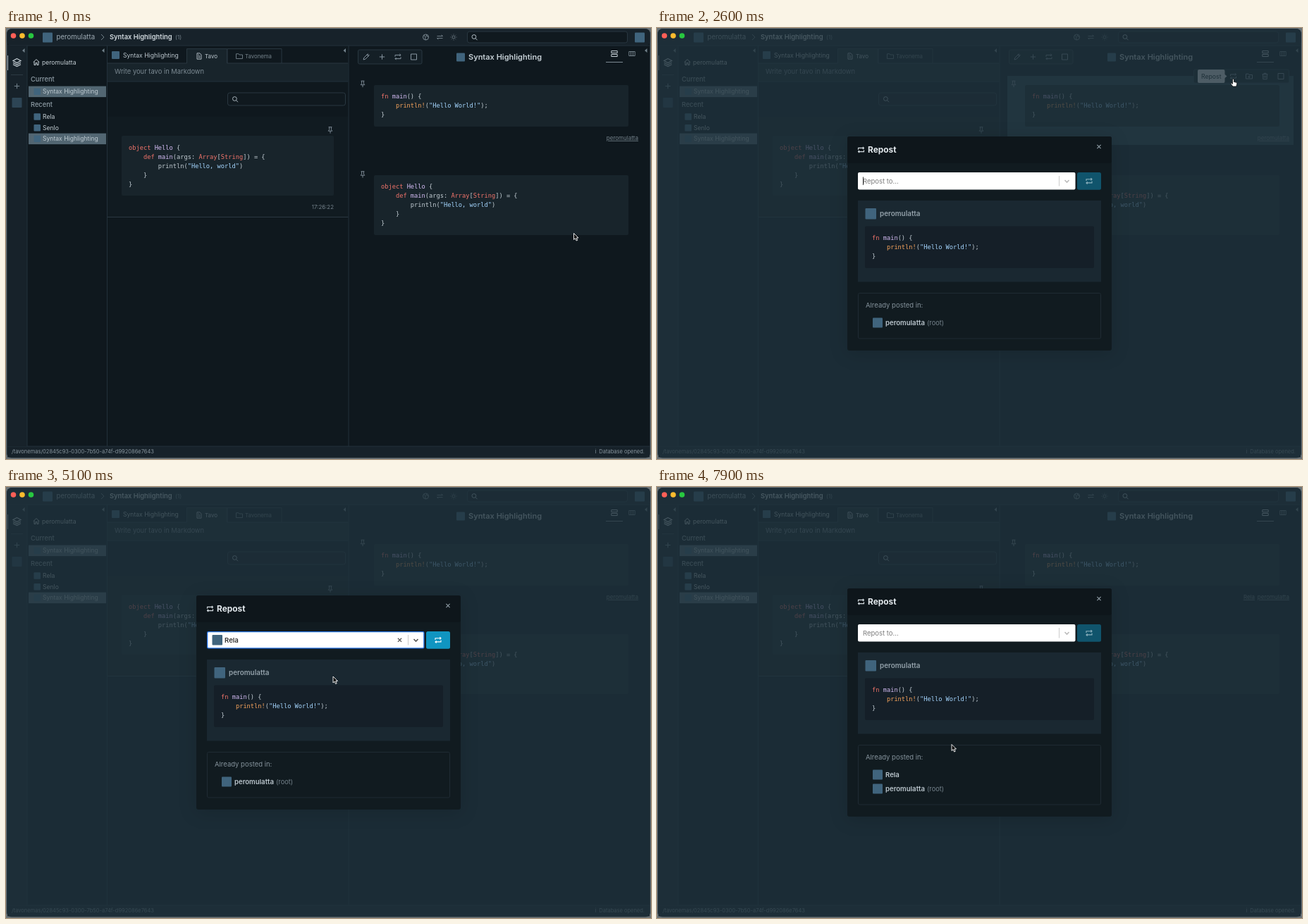
Animation, 915 px wide and 612 px high, one loop 8000 ms. Source, as an HTML page:

```html
<!DOCTYPE html>
<html lang="en">
<head>
<meta charset="utf-8">
<title>Repost dialog</title>
<style>
  html, body { margin: 0; width: 100%; height: 100%; overflow: hidden; background: #6b7377; }
  svg { display: block; width: 100%; height: 100%; }
  text { font-family: Inter, "Open Sans", sans-serif; white-space: pre; }
  .code { font: 8.7px "DejaVu Sans Mono", monospace; fill: #c2ccd3; }
  .key { fill: #f0736a; } .fn { fill: #d5bdf5; } .str { fill: #a5d6ff; } .macro { fill: #f5a35c; }
  .raised { filter: drop-shadow(0 4px 12px rgba(0, 0, 0, .14)); }
</style>
</head>
<body>
<svg id="stage" viewBox="0 0 915 612"></svg>
<script>
const LOOP = 8000, STEP = 100;
const USER = 'peromulatta', TOPIC = 'Syntax Highlighting', TARGET = 'Rela', OTHER = 'Senlo';
const stage = document.getElementById('stage');

// Stroked icons, centred on 0,0
const ICONS = {
  repost: 'M-4-.3V-2.6H4M2.4-4.2 4-2.6 2.4-1M4 .3V2.6H-4M-2.4 1-4 2.6-2.4 4.2',
  sync: 'M-4-1.5H4L2.2-3.3M4 1.5H-4L-2.2 3.3',
  pencil: 'M-4 4-3.2 1.2 2.2-4.2 4.2-2.2-1.2 3.2ZM1-3 3-1',
  plus: 'M-3.7 0H3.7M0-3.7V3.7',
  square: 'M-4-4H4V4H-4Z',
  pin: 'M-2.4-4.3H2.4M-1.4-4.3V-.6L-2.8 1.2H2.8L1.4-.6V-4.3M0 1.2V4.6',
  trash: 'M-4-2.8H4M-1.5-2.8V-4.2H1.5V-2.8M-3-2.8-2.7 4.2H2.7L3-2.8M-1-.8V2.3M1-.8V2.3',
  folder: 'M-4.5-3.3H-1L0-2H4.5V3.5H-4.5Z',
  folderPlus: 'M-4.5-3.3H-1L0-2H4.5V3.5H-4.5ZM-1.7.8H1.7M0-.9V2.5',
  doc: 'M-3-4.2H1L3-2V4.2H-3ZM-1.5 0H1.5M-1.5 2H1.5M-1.5-2H0',
  search: 'M2.3-.5A2.9 2.9 0 1 1-3.5-.5 2.9 2.9 0 0 1 2.3-.5M1.5 1.6 4 4.2',
  globe: 'M4 0A4 4 0 1 1-4 0 4 4 0 0 1 4 0M-3-2.5 0-.5-1 1.2 0 3.8M1-3.8 1-1.6 3.7-.5',
  sun: 'M2 0A2 2 0 1 1-2 0 2 2 0 0 1 2 0M0-4.5V-3.5M0 3.5V4.5M-4.5 0H-3.5M3.5 0H4.5M-3.2-3.2-2.5-2.5M2.5 2.5 3.2 3.2M-3.2 3.2-2.5 2.5M2.5-2.5 3.2-3.2',
  home: 'M-4 0 0-4 4 0M-3-1V4H-1V1H1V4H3V-1',
  layers: 'M0-5 5.5-2 0 1-5.5-2ZM-5.5.8 0 3.6 5.5.8M-5.5 3.3 0 6.1 5.5 3.3',
  rows: 'M-4.2-4H4.2V-1H-4.2ZM-4.2 1H4.2V4H-4.2Z',
  columns: 'M-4.2-3H4.2V3H-4.2ZM-1.4-3V3M1.4-3V3',
  right: 'M-2-4 2 0-2 4',
  down: 'M-3-1.6 0 1.6 3-1.6',
  close: 'M-2.6-2.6 2.6 2.6M2.6-2.6-2.6 2.6',
  arrowUp: 'M0 3.5V-3.5M-2.8-.8 0-3.5 2.8-.8',
  arrowDown: 'M0-3.5V3.5M-2.8.8 0 3.5 2.8.8',
  toTop: 'M0 4V-2M-2.8.6 0-2 2.8.6M-3.6-4.2H3.6',
  toBottom: 'M0-4V2M-2.8-.6 0 2 2.8-.6M-3.6 4.2H3.6'
};

const rect = (x, y, w, h, fill, stroke = 'none', r = 0) =>
  `<rect x="${x}" y="${y}" width="${w}" height="${h}" rx="${r}" fill="${fill}" stroke="${stroke}"/>`;
const line = (x1, y1, x2, y2, color = '#22303a') =>
  `<path d="M${x1} ${y1}L${x2} ${y2}" stroke="${color}"/>`;
const icon = (name, x, y, color = '#8795a0', width = 1) =>
  `<path transform="translate(${x} ${y})" d="${ICONS[name]}" fill="none" stroke="${color}" stroke-width="${width}"/>`;
// y is the middle of the capitals
const label = (x, y, str, size, color, weight = 400, extra = '') =>
  `<text x="${x}" y="${y + size * .36}" font-size="${size}" fill="${color}" font-weight="${weight}" ${extra}>${str}</text>`;
const avatar = (x, y, size, color = '#40647d') => rect(x, y, size, size, color, 'none', 1);
const tok = (kind, str) => `<tspan class="${kind}">${str}</tspan>`;
const code = (x, y, lines) => lines.map((s, i) =>
  `<text class="code" x="${x}" y="${y + i * 13.1}">${s}</text>`).join('');

const HELLO_FN = [
  `${tok('key', 'fn')} ${tok('fn', 'main')}() {`,
  `    ${tok('macro', 'println!')}(${tok('str', '"Hello World!"')});`,
  '}'];
const HELLO_OBJECT = [
  `${tok('key', 'object')} ${tok('fn', 'Hello')} {`,
  `    ${tok('key', 'def')} ${tok('fn', 'main')}(args: ${tok('key', 'Array')}[${tok('key', 'String')}]) = {`,
  `        println(${tok('str', '"Hello, world"')})`,
  '    }', '}'];

const chip = y => rect(32, y - 7.7, 110, 15.5, '#526672') + avatar(39.5, y - 4.7, 9.5) +
  label(52, y, TOPIC, 8.6, '#bdc9d0');
const listItem = (y, name) => avatar(39.5, y - 4.7, 9.5) + label(52, y, name, 8.6, '#c5cfd5');
const collapse = x => `<path d="M${x + 1.5} 29V35L${x - 2} 32Z" fill="#71808a"/>`;

function sidebar() {
  return rect(2, 25, 28, 569, '#17222a') + line(30, 25, 30, 594) + collapse(25) +
    line(2.5, 39, 2.5, 60, '#a9b5bd') + icon('layers', 15.5, 48.5, '#c5cfd5', 1.2) + line(7, 66.5, 24, 66.5, '#2c3a43') +
    icon('plus', 15.5, 82.5, '#74838d') + avatar(8.5, 99, 14, '#2d4555') +
    collapse(138) + icon('home', 43, 48.5, '#c5cfd5') + label(51, 48.5, USER, 8.6, '#c5cfd5') +
    label(35, 73, 'Current', 9.3, '#8f9da6', 500) + chip(90.3) +
    label(35, 108.5, 'Recent', 9.3, '#8f9da6', 500) +
    listItem(126, TARGET) + listItem(141.7, OTHER) + chip(157.3);
}

function timeline() {
  return avatar(150, 33, 11) + label(166, 38.5, TOPIC, 8.6, '#bcc7ce') +
    rect(144, 50, 341.5, 26, '#18242b') +
    `<path d="M144 50H256.5V29.5H313.5V50H485M314 50V29.5H391V50" fill="none" stroke="#293740"/>` +
    rect(257, 30, 56, 21, '#18242b') +
    icon('doc', 274, 40, '#bcc7ce', .9) + label(282, 40, 'Tavo', 8, '#bcc7ce') +
    icon('folder', 331, 40, '#74828b', .9) + label(339, 40, 'Tavonema', 7.8, '#74828b') +
    label(154, 62, 'Write your tavo in Markdown', 9.4, '#7b8992') + line(144, 76, 485, 76) +
    collapse(480.5) + rect(314.5, 92, 167, 18, '#10191f', '#293740', 3) + icon('search', 325, 101, '#aab6be') +
    rect(144, 126, 341.5, 142, '#111b21') + icon('pin', 460, 145, '#8795a0', .9) +
    rect(164, 153, 301, 85, '#18242b', 'none', 2) + code(174, 172.5, HELLO_OBJECT) +
    label(465, 254, '17:26:22', 7.9, '#74828b', 400, 'text-anchor="end"') +
    line(144, 268.5, 485.5, 268.5, '#2a3841');
}

function hoverTools(top, bottom, isFirst) {
  const tools = ['pencil', 'plus', 'repost', 'folderPlus', 'trash', 'square'];
  const moves = ['toTop', 'arrowUp', 'arrowDown', 'toBottom'];
  return rect(761.5, top - 9, 135, 19, '#141f26', '#263640', 2) +
    tools.map((n, i) => icon(n, 772.5 + i * 22.5, top + .5)).join('') +
    rect(497.5, bottom - 6.5, 87, 19.5, '#141f26', '#263640', 2) +
    moves.map((n, i) => icon(n, 508.5 + i * 21.7, bottom + 2.7, (i < 2) === isFirst ? '#3d4c56' : '#8795a0')).join('');
}

function pinned(hover, tooltip, toolbar, reposted) {
  const link = (x, s) => label(x, 156, s, 8, '#74828b', 400, 'text-anchor="end" text-decoration="underline"');
  const glow = (y, h) => rect(497, y, 406, h, '#2a3f4b');
  return (toolbar ? rect(499.5, 31, 90.5, 20, '#141f26', '#293740', 2) +
      ['pencil', 'plus', 'repost', 'square'].map((n, i) => icon(n, 511 + i * 22.5, 41)).join('') : '') +
    avatar(639, 35.5, 12) + label(656, 41, TOPIC, 11, '#c5cfd5', 600) +
    icon('rows', 863, 36.5, '#c5cfd5') + line(851, 48.5, 875, 48.5, '#7d8a93') + icon('columns', 888, 36.5, '#74828b') +
    collapse(908) +
    (hover === 1 ? glow(68, 98) : hover === 2 ? glow(197, 113) : '') +
    icon('pin', 506, 79.5, '#8795a0', .9) + rect(522, 81, 361, 59, '#18242b', 'none', 2) + code(532, 100, HELLO_FN) +
    link(897, USER) + (reposted ? link(848, TARGET) : '') +
    icon('pin', 506, 208, '#8795a0', .9) + rect(522, 209, 361, 85, '#18242b', 'none', 2) + code(532, 228, HELLO_OBJECT) +
    (hover === 1 ? hoverTools(68, 166, true) : hover === 2 ? hoverTools(197, 310, false) : '') +
    (tooltip ? rect(767, 59, 38.5, 19, '#f2f4f6', 'none', 2) + '<path d="M805 65.5 808.5 68.5 805 71.5Z" fill="#f2f4f6"/>' +
      label(772, 68.5, 'Repost', 8.7, '#1a242b') : '');
}

function frameBars() {
  return rect(1.5, 1.5, 912, 23.5, '#17222a', 'none', 6) + line(2, 25, 913, 25) +
    avatar(52, 6.5, 14) + label(71.5, 13, USER, 9.7, '#9eabb4') + icon('right', 137, 13, '#74828b') +
    label(147, 13, TOPIC, 9.4, '#d3dbe0', 600) + label(240, 13, '(1)', 8, '#74828b') +
    icon('globe', 595.5, 13, '#7b8992') + icon('sync', 615.5, 13, '#7b8992', .9) + icon('sun', 635, 13, '#6a7881', .9) +
    rect(654.5, 5, 227, 16, '#10191f', '#293740', 3) + icon('search', 664.5, 13, '#b3bfc6') + avatar(892, 6.5, 14) +
    rect(2, 594, 911, 15.5, '#17222a') + line(2, 594, 913, 594) +
    label(8, 601.5, '/tavonemas/02845c93-0300-7b50-a74f-d992086e7643', 7.5, '#87949d') +
    label(835.5, 601.5, 'i', 7.5, '#87949d') + label(906, 601.5, 'Database opened.', 7.5, '#87949d', 400, 'text-anchor="end"');
}

function selectBox(t) {
  const focused = t >= 2700 && t < 6800, chosen = t >= 5100 && t < 6800, typed = t >= 4200 && t < 5100;
  const caret = t < 4200 && Math.floor((t - 2600) / 500) % 2 === 0;
  const active = chosen && t < 6600;
  return rect(285, 205, 308.5, 24.5, focused ? '#2674e8' : '#fff', 'none', 2) +
    rect(286.3, 206.3, 305.9, 21.9, '#fff', 'none', 1) +
    (chosen ? avatar(292.5, 210, 14.5) + label(310, 217.3, TARGET, 9.6, '#333', 600) + icon('close', 558.5, 217.3, '#555', 1.3)
      : typed ? label(292, 217.3, 'r', 9.5, '#333') : label(292, 217.3, 'Repost to...', 9.5, '#7d7d7d')) +
    (caret ? line(292.5, 211.5, 292.5, 223, '#333') : '') +
    line(570.5, 210, 570.5, 224.5, '#ccc') + icon('down', 581.5, 217.5, focused ? '#555' : '#bbb', 1.5) +
    rect(596, 205, 34, 24.7, active ? '#1095c1' : '#10546c', 'none', 2.5) +
    icon('repost', 613, 217.3, active ? '#fff' : '#8db2bf', 1.1);
}

function menu(t) {
  const onSecond = t >= 4600;
  return rect(285, 235.5, 308.5, 54.5, '#fff', '#c5cbd0', 2) +
    rect(285.5, onSecond ? 262 : 237, 307.5, 25, t >= 4900 ? '#b2d4ff' : '#deebff') +
    label(293, 249.7, 'New tavonema:', 9.5, '#777') + avatar(370, 242, 15) + label(388, 249.7, 'r', 9.6, '#444', 600) +
    avatar(293, 267, 15) + label(311, 274.5, TARGET, 9.6, '#444', 600);
}

function dialog(t) {
  const reposted = t >= 6800, extra = reposted ? 20 : 0;
  const posted = (y, name, note = '') => avatar(306, y - 7, 14) +
    label(324, y, `${name}<tspan dx="3" font-weight="400" font-size="9.3" fill="#74828b">${note}</tspan>`, 9.6, '#bcc7ce', 600);
  return `<g transform="translate(0 ${-extra / 2})">` +
    `<g class="raised">${rect(270, 154, 375, 304 + extra, '#111b20', 'none', 3)}</g>` +
    rect(270, 154, 375, 38, '#0e161b', 'none', 3) +
    icon('repost', 289.5, 173, '#d3dbe0', 1.1) + label(299, 173, 'Repost', 11.9, '#e2e8ec', 700) +
    icon('close', 627, 168.5, '#8b98a1', 1.2) +
    rect(285, 245, 345, 115.5, '#1a2831') + avatar(295.5, 256, 15.5) + label(316, 263.5, USER, 9.9, '#93a1aa', 600) +
    rect(295, 281.5, 325, 59.5, '#151f28', 'none', 2) + code(305, 300.7, HELLO_FN) +
    rect(285.5, 376.5, 344, 64.5 + extra, 'none', '#1f2b33', 2) + label(296, 394, 'Already posted in:', 9.5, '#84929b') +
    (reposted ? posted(418.5, TARGET) : '') + posted(418.5 + extra, USER, '(root)') +
    selectBox(t) + (t >= 4300 && t < 5100 ? menu(t) : '') + '</g>';
}

// Pointer tip: time, x, y
const PATH = [[0, 805.5, 291.5], [500, 744.5, 139.5], [900, 752, 122], [1600, 817.5, 72.5], [3300, 817.5, 72.5],
  [4200, 466.5, 254], [4400, 466.5, 254], [4600, 464, 269], [5100, 464, 269], [5900, 611, 224.5],
  [6800, 611, 224.5], [7700, 418, 365.5], [LOOP, 418, 365.5]];
function pointerAt(t) {
  const i = PATH.findIndex(p => p[0] > t);
  const [t0, x0, y0] = PATH[i - 1], [t1, x1, y1] = PATH[i];
  const u = (t - t0) / (t1 - t0), e = u * u * (3 - 2 * u);
  return [x0 + (x1 - x0) * e, y0 + (y1 - y0) * e];
}
function pointer(x, y, hand) {
  const shape = hand
    ? '<path d="M-1 .5Q0-.7 1 .5V4L4.5 4.8Q5.5 5.2 5.2 7L4.3 10.5H-.6L-3.6 6.5Q-3.5 5.2-2.3 5.8L-1 7Z" fill="#fff" stroke="#111" stroke-width=".8"/>'
    : '<path d="M0 0V9L2.1 7.1 3.6 10.5 5.2 9.8 3.7 6.5H6.5Z" fill="#0a0a0a" stroke="#fff" stroke-width=".9"/>';
  return `<g transform="translate(${x} ${y})">${shape}</g>`;
}

function scene(t) {
  const [x, y] = pointerAt(t), open = t >= 2600, paneHovered = t < 2900;
  const hover = t < 100 || !paneHovered ? 0 : y > 60 && y < 166 ? 1 : y > 197 && y < 310 ? 2 : 0;
  const hand = (t >= 1500 && t < 3400) || (t >= 5900 && t < 6900);
  return rect(1.5, 1.5, 912, 608.5, '#0f181e', '#2b363d', 6) + frameBars() + sidebar() + timeline() +
    line(143.5, 25, 143.5, 594) + line(486, 25, 486, 594) +
    pinned(hover, t >= 1500 && paneHovered, paneHovered, t >= 6800) +
    (open ? rect(1.5, 1.5, 912, 608.5, 'rgba(31,51,61,.78)', 'none', 6) + dialog(t) : '') +
    ['#fe5f57', '#febc2e', '#28c840'].map((c, i) => `<circle cx="${10.5 + i * 12.5}" cy="11" r="3.8" fill="${c}"/>`).join('') +
    pointer(x, y, hand);
}

let shown = -1;
function tick() {
  const t = Math.floor(performance.now() % LOOP / STEP) * STEP;
  if (t !== shown) stage.innerHTML = scene(shown = t);
  requestAnimationFrame(tick);
}
tick();
</script>
</body>
</html>
```
